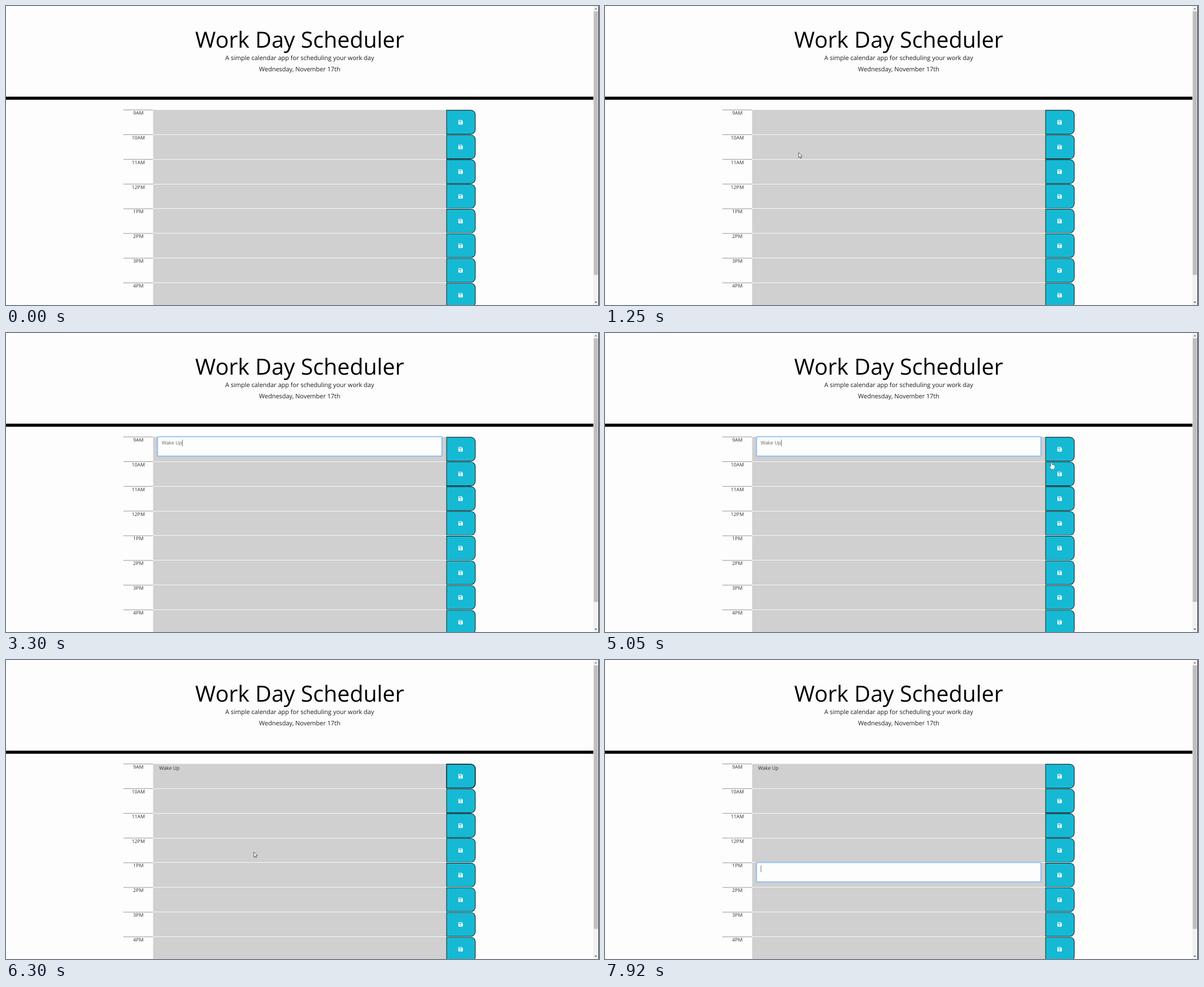
An HTML page with a canvas for the animation above (8 s loop, 1054 by 531 pixels).

```html
<!DOCTYPE html>
<html lang="en">
<head>
<meta charset="utf-8">
<title>Work Day Scheduler</title>
<style>
html, body { margin: 0; width: 100%; height: 100%; overflow: hidden; background: #fdfdfd; }
canvas { display: block; }
</style>
</head>
<body>
<canvas id="stage" width="1054" height="531"></canvas>
<script>
const ctx = document.getElementById('stage').getContext('2d');
const LOOP = 8000;
const PAGE = '#fdfdfd';
const TEAL = [22, 185, 212], GREEN = [10, 150, 10];
const HOURS = ['9AM', '10AM', '11AM', '12PM', '1PM', '2PM', '3PM', '4PM'];
const TASK = 'Wake Up';
const TOP = 184.5, PITCH = 43.87;
const rowTop = i => TOP + i * PITCH;

// Timing of the interaction, in ms
const OPEN_FIRST = 1620, TYPE_START = 2670, KEY_GAP = 105, SAVE = 5810, OPEN_SECOND = 7210;
const HOVER_IN = 5120, HOVER_OUT = 5860;
const CARET_ON = [[1620, 2150], [2670, 3860], [4420, 5080], [7210, 7890], [7920, 8000]];
const POINTER_ON = [[790, 2670], [4790, 7920]];
const PATH = [
  [790, 640, 545], [1420, 280.5, 199], [4790, 280.5, 199], [5050, 793.7, 230.5],
  [5330, 799.8, 212.5], [5810, 799.8, 212.5], [6300, 440.5, 341], [6570, 352, 367],
  [6630, 352, 367], [7180, 271, 367], [8000, 271, 367]
];

const clamp = v => Math.max(0, Math.min(1, v));
const smooth = v => v * v * (3 - 2 * v);
const within = (ranges, t) => ranges.some(([a, b]) => t >= a && t < b);

function pointerAt(t) {
  const i = Math.max(1, PATH.findIndex(p => p[0] > t));
  const [t0, x0, y0] = PATH[i - 1], [t1, x1, y1] = PATH[i];
  const k = smooth(clamp((t - t0) / (t1 - t0)));
  return [x0 + (x1 - x0) * k, y0 + (y1 - y0) * k];
}

function text(str, x, y, size, color, align = 'left') {
  ctx.font = `${size}px "Open Sans", sans-serif`;
  ctx.textAlign = align;
  ctx.fillStyle = color;
  ctx.fillText(str, x, y);
}

function rect(x, y, w, h, color) {
  ctx.fillStyle = color;
  ctx.fillRect(x, y, w, h);
}

function polygon(points, fill) {
  ctx.beginPath();
  points.forEach(([x, y]) => ctx.lineTo(x, y));
  ctx.closePath();
  ctx.fillStyle = fill;
  ctx.fill();
}

function drawHeader() {
  text('Work Day Scheduler', 522, 74, 39.5, '#000', 'center');
  text('A simple calendar app for scheduling your work day', 522, 96, 10.98, '#1c1c1c', 'center');
  text('Wednesday, November 17th', 522, 115.8, 10.98, '#1c1c1c', 'center');
  rect(0, 161, 1044, 5.5, '#000');
}

function drawScrollbar() {
  rect(1044, 0, 9, 531, '#f1f1f1');
  rect(1044.7, 9.5, 7.6, 468, '#bfbfbf');
  rect(1053, 0, 1, 531, '#1b1b1b');
  polygon([[1046, 6], [1048.3, 3.6], [1050.6, 6]], '#777');
  polygon([[1046, 525], [1048.3, 527.4], [1050.6, 525]], '#555');
}

function drawDisk(cx, cy, s) {
  ctx.save();
  ctx.translate(cx - s / 2, cy - s / 2);
  ctx.scale(s, s);
  ctx.beginPath();
  ctx.moveTo(0.1, 0);
  ctx.lineTo(0.75, 0);
  ctx.lineTo(1, 0.25);
  ctx.lineTo(1, 0.9);
  ctx.quadraticCurveTo(1, 1, 0.9, 1);
  ctx.lineTo(0.1, 1);
  ctx.quadraticCurveTo(0, 1, 0, 0.9);
  ctx.lineTo(0, 0.1);
  ctx.quadraticCurveTo(0, 0, 0.1, 0);
  ctx.closePath();
  ctx.rect(0.14, 0.14, 0.57, 0.23);
  ctx.moveTo(0.64, 0.7);
  ctx.arc(0.5, 0.7, 0.14, 0, Math.PI * 2);
  ctx.fillStyle = '#fff';
  ctx.fill('evenodd');
  ctx.restore();
}

function drawButton(y, hover, focused) {
  const rgb = TEAL.map((c, i) => Math.round(c + (GREEN[i] - c) * hover));
  ctx.beginPath();
  ctx.roundRect(783.1, y + 0.6, 51, 42.4, [0, 8, 8, 0]);
  ctx.fillStyle = `rgb(${rgb})`;
  ctx.fill();
  ctx.strokeStyle = '#17282c';
  ctx.lineWidth = focused ? 1.6 : 1.1;
  ctx.stroke();
  drawDisk(808, y + 22, 7.8 + 2 * hover);
}

function drawRow(i, t) {
  const y = rowTop(i);
  ctx.strokeStyle = '#2b2b2b';
  ctx.lineWidth = 0.8;
  ctx.setLineDash([1.7, 1.05]);
  ctx.beginPath();
  ctx.moveTo(209.2, y + 0.1);
  ctx.lineTo(261.5, y + 0.1);
  ctx.stroke();
  ctx.setLineDash([]);

  text(HOURS[i], 235.2, y + 8.5, 8.78, '#333', 'center');
  rect(261.5, y, 521.2, PITCH, '#d0d0d1');
  if (i) rect(261.5, Math.round(y - 0.5), 573, 1, '#f8f8f5');

  const hover = i ? 0 : clamp((t - HOVER_IN) / 150) * (1 - clamp((t - HOVER_OUT) / 150));
  drawButton(y, smooth(hover), i === 0 && t >= SAVE && t < OPEN_SECOND);
}

function drawEditor(i, opened, t, value) {
  const y = rowTop(i) - 0.2, focus = smooth(clamp((t - opened) / 150));
  ctx.beginPath();
  ctx.roundRect(267.8, y - 1.5, 508.4, 37.2, 3.5);
  ctx.fillStyle = `rgba(120, 180, 245, ${0.5 * focus})`;
  ctx.fill();
  ctx.beginPath();
  ctx.roundRect(269.7, y + 0.3, 504.6, 33.6, 2);
  ctx.fillStyle = PAGE;
  ctx.fill();
  ctx.strokeStyle = `rgba(128, 184, 245, ${focus})`;
  ctx.lineWidth = 0.9;
  ctx.stroke();

  text(value, 276.7, y + 14, 8.78, '#63676b');
  if (within(CARET_ON, t)) {
    rect(276.8 + ctx.measureText(value).width, y + 5, 0.9, 12, '#606468');
  }
}

function drawArrow(x, y) {
  ctx.save();
  ctx.translate(x, y);
  ctx.scale(0.55, 0.55);
  polygon([[0, 0], [0, 16.5], [3.8, 13], [6.4, 18.6], [9, 17.4], [6.5, 12], [11.5, 11.6]], '#fff');
  ctx.strokeStyle = '#222';
  ctx.lineWidth = 1.3;
  ctx.stroke();
  ctx.restore();
}

function drawHand(x, y) {
  ctx.save();
  ctx.translate(x, y);
  ctx.scale(0.55, 0.55);
  ctx.beginPath();
  ctx.moveTo(-1.8, 1.5);
  ctx.quadraticCurveTo(0, -1, 1.8, 1.5);
  ctx.lineTo(1.8, 6.5);
  ctx.lineTo(9, 8.2);
  ctx.quadraticCurveTo(11, 9, 10.6, 13);
  ctx.lineTo(8.2, 20.5);
  ctx.lineTo(-0.8, 20.5);
  ctx.lineTo(-5.6, 13);
  ctx.quadraticCurveTo(-5.5, 10.2, -1.8, 12.8);
  ctx.closePath();
  ctx.strokeStyle = '#222';
  ctx.lineWidth = 1.4;
  ctx.stroke();
  ctx.fillStyle = '#fff';
  ctx.fill();
  ctx.restore();
}

function drawPointer(t) {
  if (!within(POINTER_ON, t)) return;
  const [x, y] = pointerAt(t);
  const overButton = x > 783 && x < 834 && y > TOP;
  (overButton ? drawHand : drawArrow)(x, y);
}

function draw(t) {
  ctx.textRendering = 'geometricPrecision';
  rect(0, 0, 1054, 531, PAGE);
  drawHeader();
  HOURS.forEach((_, i) => drawRow(i, t));

  if (t >= OPEN_FIRST && t < SAVE) {
    const typed = Math.max(0, Math.floor((t - TYPE_START) / KEY_GAP) + 1);
    drawEditor(0, OPEN_FIRST, t, TASK.slice(0, typed));
  } else if (t >= SAVE) {
    text(TASK, 272.2, TOP + 10.7, 8.78, '#333');
  }
  if (t >= OPEN_SECOND) drawEditor(4, OPEN_SECOND, t, '');

  drawScrollbar();
  drawPointer(t);
}

const start = performance.now();
function tick() {
  draw((performance.now() - start) % LOOP);
  requestAnimationFrame(tick);
}
tick();
</script>
</body>
</html>
```
